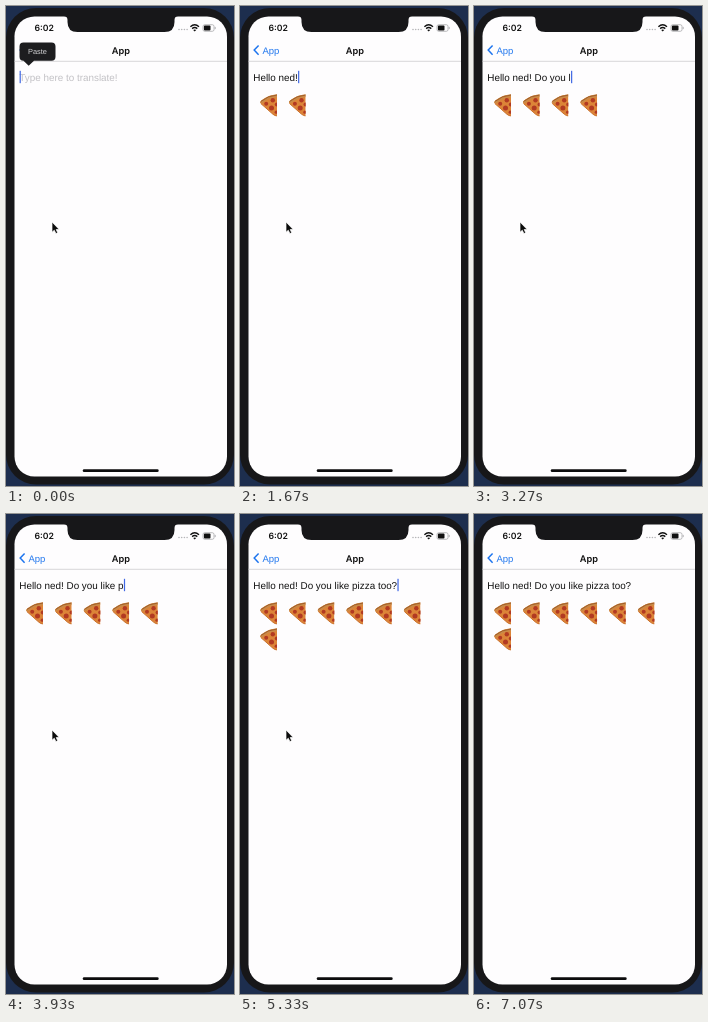
Recreate the animation shown at these times as an HTML page. Size 228 by 480 pixels, loop 7.39 s.

```html
<!DOCTYPE html>
<html lang="en">
<head>
<meta charset="utf-8">
<title>Emoji translator</title>
<style>
  html, body { margin: 0; width: 100%; height: 100%; overflow: hidden; background: #1d2e4e; }
  svg { display: block; width: 228px; height: 480px; }
  text { font-family: "Liberation Sans", Arial, sans-serif; white-space: pre; text-rendering: geometricPrecision; }
  .strong { font-family: Inter, "Liberation Sans", sans-serif; font-weight: 600; fill: #111; }
  .entry { font-size: 9.9px; }
  #bubble { animation: fade 7390ms linear infinite; }
  #caret { animation: blink 7390ms linear infinite; }
  #pointer { animation: leave 7390ms linear infinite; }
  @keyframes fade {
    0%, 0.8% { opacity: 1; }
    3.65%, 100% { opacity: 0; }
  }
  @keyframes blink {
    0%, 79.2% { opacity: 1; }
    82.1%, 86.6% { opacity: 0; }
    88.7%, 92.7% { opacity: 1; }
    95.4%, 100% { opacity: 0; }
  }
  @keyframes leave {
    0%, 85.6% { transform: translate(0, 0); }
    85.63% { transform: translate(2px, -5px); }
    86.5% { transform: translate(2px, -5px); animation-timing-function: ease-in-out; }
    94.7%, 100% { transform: translate(88px, -236px); }
  }
</style>
</head>
<body>
<svg viewBox="0 0 228 480">
  <defs>
    <clipPath id="cell"><rect x="0" y="0" width="17" height="24"/></clipPath>
    <g id="slice" clip-path="url(#cell)">
      <path d="M.3 9.6Q-.2 7.6 2.4 6.3Q8.5 1.4 17 1V22.4Q15 22.4 13 20.8Z" fill="#dc8438"/>
      <path d="M.3 9.4Q-.2 7.6 2.4 6.3Q8.5 1.4 17 1V3.6Q9 4.5 3.4 8.8Q1.5 10.6.3 9.4Z" fill="#c98a48"/>
      <path d="M1 7.9Q8 2.1 17 1.5" fill="none" stroke="#9c5a28" stroke-width=".9"/>
      <path d="M1 10.2L13 20.8Q15 22.4 17 22.4" fill="none" stroke="#c9702c" stroke-width="1"/>
      <g fill="#b23a22">
        <circle cx="6.2" cy="10.2" r="2"/>
        <circle cx="12.8" cy="6.7" r="2.2"/>
        <circle cx="11.5" cy="14.6" r="2.5"/>
        <circle cx="16.8" cy="11" r="2"/>
        <circle cx="16.2" cy="18.7" r="1.6"/>
      </g>
    </g>
  </defs>

  <rect width="228" height="480" fill="#1d2e4e"/>
  <rect y="2" width="228" height="476.5" rx="30" fill="#171719"/>
  <rect x="8.5" y="10.5" width="212.5" height="460" rx="20" fill="#fefdfe"/>
  <path d="M58 10H172Q168.500 10.500 168.500 14V16Q168.500 26 158.500 26H71.500Q61.500 26 61.500 16V14Q61.500 10.500 58 10Z" fill="#171719"/>
  <path d="M8.500 55.300H221" stroke="#cfcdd0" stroke-width=".8"/>

  <text class="strong" x="28.500" y="25" font-size="8.7">6:02</text>
  <g fill="#b5b5b8">
    <circle cx="173" cy="23.500" r=".8"/><circle cx="175.700" cy="23.500" r=".8"/>
    <circle cx="178.400" cy="23.500" r=".8"/><circle cx="181.100" cy="23.500" r=".8"/>
  </g>
  <g fill="none" stroke="#111" stroke-width="1.4">
    <path d="M184.400 20.700Q188.700 17 193 20.700"/>
    <path d="M186.100 22.600Q188.700 20.500 191.300 22.600"/>
  </g>
  <path d="M187.200 24L188.700 25.600L190.200 24Q188.700 22.900 187.200 24Z" fill="#111"/>
  <rect x="197" y="18.700" width="11" height="6.600" rx="1.700" fill="none" stroke="#a0a0a3" stroke-width=".7"/>
  <rect x="197.900" y="19.600" width="6.600" height="4.800" rx=".9" fill="#111"/>
  <path d="M209.200 20.900V23.100" stroke="#a0a0a3" stroke-width=".8"/>

  <path d="M18.600 39.600L14.200 44.100L18.600 48.700" fill="none" stroke="#1c74ee" stroke-width="1.500"/>
  <text x="22.400" y="47.500" font-size="9.500" fill="#2479ee">App</text>
  <text class="strong" x="114.800" y="47.500" font-size="9.200" text-anchor="middle">App</text>

  <text id="hint" class="entry" x="13.300" y="74.700" fill="#c2c1c5">Type here to translate!</text>
  <text id="typed" class="entry" x="13.300" y="74.700" fill="#111"></text>
  <rect id="caret" x="13.600" y="64.800" width="1.200" height="12.400" fill="#4068e4"/>
  <g id="slices"></g>

  <g id="bubble">
    <path d="M17.500 36.500H45.500Q49.500 36.500 49.500 40.500V50.800Q49.500 54.800 45.500 54.800H28L22.700 59.800L17.500 54.800Q13.500 54.800 13.500 50.800V40.500Q13.500 36.500 17.500 36.500Z" fill="#1d1d1f"/>
    <text x="22" y="48.300" font-size="7.400" fill="#d2d2d4">Paste</text>
  </g>

  <rect x="76.700" y="463.300" width="76" height="2.800" rx="1.400" fill="#0c0c0d"/>
  <path id="pointer" d="M46 216V226.200L48.300 224.200L49.900 227.600L51.700 226.800L50.200 223.500H53.200Z" fill="#0b0b0b" stroke="#fff" stroke-width=".7"/>
</svg>
<script>
  const LOOP = 7390;
  const MESSAGE = "Hello ned! Do you like pizza too?";
  const keyTimes = [
    330, 670, 730, 870, 930, 1000, 1130, 1200, 1400, 1670, 2000,
    2330, 2530, 2870, 2930, 3000, 3070, 3130, 3270, 3400, 3670, 3800,
    3870, 3930, 4070, 4130, 4270, 4400, 4600, 4670, 4870, 5000, 5330
  ];
  const sliceTimes = [400, 1270, 2400, 3000, 3330, 4000, 4730];
  const PER_ROW = 6;

  const byId = id => document.getElementById(id);
  const hint = byId("hint"), typed = byId("typed"), caret = byId("caret");

  const slices = sliceTimes.map((_, i) => {
    const use = document.createElementNS("http://www.w3.org/2000/svg", "use");
    use.setAttribute("href", "#slice");
    use.setAttribute("x", 20 + 28.7 * (i % PER_ROW));
    use.setAttribute("y", 87.5 + 26 * Math.floor(i / PER_ROW));
    use.setAttribute("visibility", "hidden");
    byId("slices").append(use);
    return use;
  });

  const show = (el, on) => el.setAttribute("visibility", on ? "visible" : "hidden");
  let start, shown = -1;

  function draw(now) {
    start ??= now;
    const t = (now - start) % LOOP;
    const count = keyTimes.filter(k => k <= t).length;
    if (count !== shown) {
      shown = count;
      typed.textContent = MESSAGE.slice(0, count);
      show(hint, count === 0);
      const width = count ? typed.getComputedTextLength() : 0;
      caret.setAttribute("x", 13.6 + width);
    }
    slices.forEach((el, i) => show(el, sliceTimes[i] <= t));
    requestAnimationFrame(draw);
  }
  requestAnimationFrame(draw);
</script>
</body>
</html>
```
